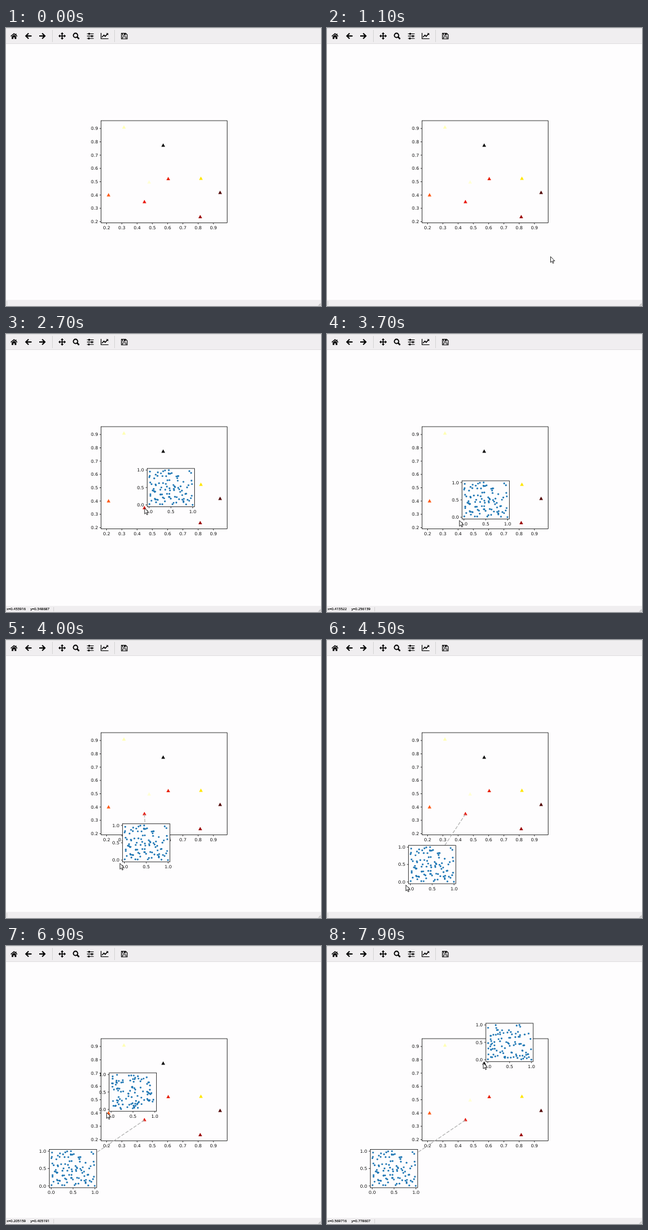
Write an HTML page that moves like this. It is 512 px wide and 453 px high and loops after 8 s.

```html
<!DOCTYPE html>
<html lang="en">
<head>
<meta charset="utf-8">
<title>Hover scatter plot</title>
<style>
  html, body { margin: 0; width: 100%; height: 100%; overflow: hidden; background: #fefdfe; }
  svg { display: block; width: 512px; height: 453px; }
  .tick { font: 7.2px "DejaVu Sans", sans-serif; fill: #111; }
  #status { font: 5.8px "Open Sans", sans-serif; fill: #000; stroke: #000; stroke-width: .15; white-space: pre; }
  .line { fill: none; stroke: #000; }
</style>
</head>
<body>
<svg id="stage" viewBox="0 0 512 453">
  <rect width="512" height="453" fill="#fefdfe"/>
  <rect width="512" height="25.5" fill="#f0eef0"/>
  <path d="M0 .5H512M0 25.5H512" stroke="#e0dfe0"/>
  <path d="M75.5 3V23M176.5 3V23" stroke="#d6d5d6"/>
  <rect y="443" width="512" height="10" fill="#f0eef0"/>
  <path id="divider" d="M1.5 445V452" stroke="#d4d3d4"/>
  <path d="M507 452.500L511.500 448V452.500Z" fill="#c4c3c4"/>

  <g id="icons">
    <path d="M7.800 13.500L13 9.200 18.200 13.500" class="line" stroke-width="1.300"/>
    <path d="M9.300 14L13 11 16.700 14V18H14.100V15.200H11.900V18H9.300ZM15.500 9.300H16.900V12L15.500 11Z"/>
    <path d="M41.500 13H32.500M36.700 8.600L32.300 13 36.700 17.400M54 13H63M58.800 8.600L63.200 13 58.800 17.400" class="line" stroke-width="2"/>
    <path d="M86.500 13H96M91.250 8.200V17.800" class="line" stroke-width="1.600"/>
    <path d="M91.250 7L93.700 9.800H88.800ZM91.250 19L93.700 16.200H88.800ZM85.200 13L88 10.600V15.400ZM97.300 13L94.500 10.600V15.400Z"/>
    <circle cx="113" cy="12" r="3.500" class="line" stroke-width="1.800"/>
    <path d="M115.600 14.600L118.800 17.800" class="line" stroke-width="2.400"/>
    <path d="M131.700 9.500H142.500M131.700 13.200H142.500M131.700 17H142.500" class="line" stroke-width="1.200"/>
    <path d="M134 8H136.300V11H134ZM138.500 11.700H140.800V14.700H138.500ZM133.500 15.500H135.800V18.500H133.500Z"/>
    <path d="M154.500 8V17.500H166.500" class="line" stroke-width="1.100"/>
    <path d="M156 15L159.200 11.600 161.200 13.600 165 9.600" class="line" stroke-width="1.500"/>
    <path d="M162.700 8.500H166.200V12Z"/>
    <path d="M187.600 8.600H194.600L197 11V17.700H187.600Z" class="line" stroke-width="1.100"/>
    <path d="M189.500 8.600V11.800H194V8.600M189.500 17.700V14.300H195V17.700" class="line"/>
    <path d="M192 9H193.600V11.500H192Z"/>
  </g>

  <g id="plot"></g>
  <line id="link" stroke="#aaa" stroke-width="1.1" stroke-dasharray="5.5 2.4"/>
  <g id="popups"></g>
  <text id="status" x="1" y="450.200"></text>
  <path id="cursor" d="M0 0V9.500L2.200 7.500 3.700 11 5.200 10.300 3.700 7H6.700Z" fill="#fff" stroke="#000" stroke-width=".8"/>
</svg>
<script>
const $ = id => document.getElementById(id);
const LOOP = 8000, STEP = 100;
const BOX = { x: 154.5, y: 151, w: 205, h: 166.5 };
const POP = { w: 77, h: 62.4, dx: 2.9, dy: -64.2 };
const GRAB = 3600, DROP = 5100, PINNED = 5;

// data <-> pixels
const toX = v => 163.5 + (v - .2) * 248;
const toY = v => 315.5 - (v - .2) * 216.7;
const fromX = x => .2 + (x - 163.5) / 248;
const fromY = y => .2 + (315.5 - y) / 216.7;

const markers = [
  [191.7, 161.5, '#ffffb4'], [255.5, 191, '#000'], [263.7, 245.5, '#e8220c'],
  [316.8, 245, '#ffe600'], [166.7, 272, '#ff5a14'], [225, 283, '#ea1408'],
  [348, 268, '#500404'], [315.7, 307.5, '#9c0404'], [232.6, 251, '#ffffd4']
];

// pointer path: time, x, y
const path = [
  [0, 421, 465], [400, 421, 465], [500, 421, 451], [600, 421, 451],
  [1500, 319.5, 309], [1800, toX(.824906), toY(.240593)], [1900, toX(.824906), toY(.240593)],
  [2600, 227, 281.5], [2700, toX(.453916), toY(.348687)], [GRAB, toX(.453916), toY(.348687)],
  [4000, 186.4, 363.5], [4600, 118, 406], [4800, 93, 409], [DROP, 67.4, 395.7], [5400, 67.4, 395.7],
  [6300, 163.5, 270.5], [6600, 164.3, 270.8], [6900, toX(.205159), toY(.405191)],
  [7000, 165.3, 271], [7100, 165.3, 271],
  [7700, 254.5, 191], [7900, toX(.569716), toY(.778607)], [LOOP, toX(.569716), toY(.778607)]
];

function pointer(t) {
  const i = path.findIndex(p => p[0] > t);
  const [t0, x0, y0] = path[i - 1], [t1, x1, y1] = path[i];
  const k = (t - t0) / (t1 - t0);
  return [x0 + (x1 - x0) * k, y0 + (y1 - y0) * k];
}

function add(parent, tag, attrs, text) {
  const el = document.createElementNS('http://www.w3.org/2000/svg', tag);
  for (const k in attrs) el.setAttribute(k, attrs[k]);
  if (text) el.textContent = text;
  return parent.appendChild(el);
}

function axes(g, { x, y, w, h }, values, px, py) {
  add(g, 'rect', { x, y, width: w, height: h, fill: '#fefdfe', stroke: '#000', 'stroke-width': .75 });
  for (const v of values) {
    const tx = px(v), ty = py(v), label = v.toFixed(1);
    add(g, 'path', { d: `M${tx} ${y + h}v2.5M${x} ${ty}h-2.5`, class: 'line', 'stroke-width': .7 });
    add(g, 'text', { x: tx, y: y + h + 10.4, class: 'tick', 'text-anchor': 'middle' }, label);
    add(g, 'text', { x: x - 5, y: ty + 2.6, class: 'tick', 'text-anchor': 'end' }, label);
  }
}

function random(seed) {
  return () => (seed = (seed * 16807) % 2147483647) / 2147483647;
}

function makePopup(index) {
  const g = add($('popups'), 'g', {}), rnd = random(7919 * (index + 3));
  const px = v => 3.2 + v * 71, py = v => 59.4 - v * 56.6;
  axes(g, { x: 0, y: 0, w: POP.w, h: POP.h }, [0, .5, 1], px, py);
  for (let i = 0; i < 100; i++)
    add(g, 'circle', { cx: px(rnd()), cy: py(rnd()), r: 1.45, fill: '#1f77b4' });
  return g;
}

axes($('plot'), BOX, [.2, .3, .4, .5, .6, .7, .8, .9], toX, toY);
for (const [x, y, fill] of markers)
  add($('plot'), 'path', { d: `M${x} ${y - 2.9}l3 5.5h-6Z`, fill });
const popups = markers.map((_, i) => makePopup(i));

function draw(t) {
  const [mx, my] = pointer(t);
  const pinned = t >= GRAB;
  $('cursor').setAttribute('transform', `translate(${mx - 1.2} ${my + .4})`);

  markers.forEach(([x, y], i) => {
    const held = pinned && i === PINNED;
    const show = held || Math.hypot(mx - x, my - y) < 5;
    const [ax, ay] = held ? pointer(Math.min(t, DROP)) : [mx, my];
    const left = ax + POP.dx, top = ay + POP.dy;
    popups[i].style.display = show ? '' : 'none';
    popups[i].setAttribute('transform', `translate(${left} ${top})`);
    if (held) {
      const ends = { x1: x, y1: y + .7, x2: left + POP.w / 2, y2: top + POP.h / 2 };
      for (const k in ends) $('link').setAttribute(k, ends[k]);
    }
  });
  $('link').style.display = pinned ? '' : 'none';

  // the status divider sits after the text
  const inside = mx > BOX.x && mx < BOX.x + BOX.w && my > BOX.y && my < BOX.y + BOX.h;
  $('divider').setAttribute('transform', `translate(${inside ? 76 : 0} 0)`);
  $('status').textContent = inside
    ? `x=${fromX(mx).toFixed(6)}\u00a0\u00a0\u00a0\u00a0\u00a0y=${fromY(my).toFixed(6)}` : '';
}

const start = performance.now();
function frame() {
  const t = (performance.now() - start) % LOOP;
  draw(Math.floor(t / STEP) * STEP);
  requestAnimationFrame(frame);
}
frame();
</script>
</body>
</html>
```
